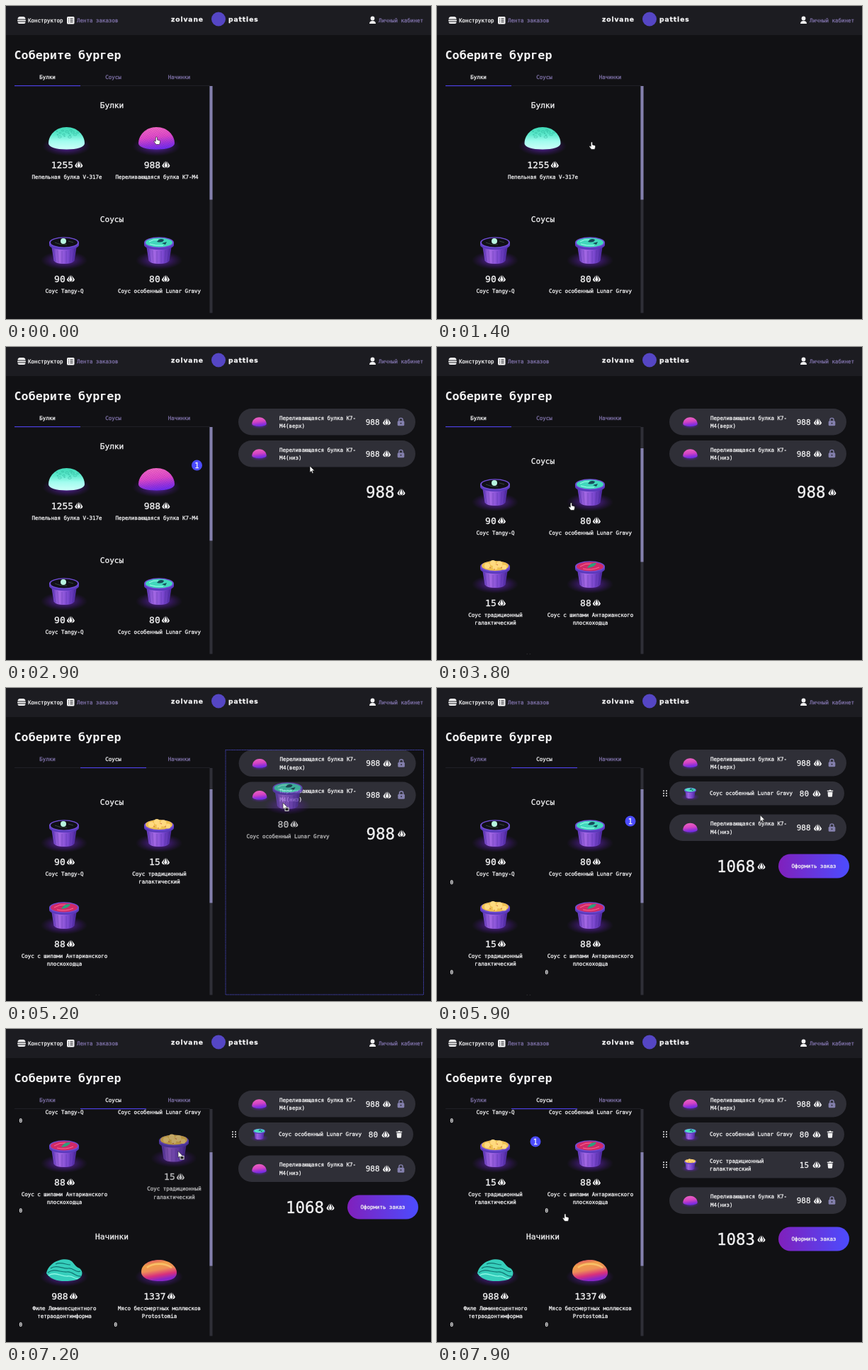
An HTML page for the animation above (8000 ms loop, 600x442 px).

```html
<!DOCTYPE html>
<html lang="ru">
<head>
<meta charset="utf-8">
<title>Соберите бургер</title>
<style>
  html, body { margin: 0; width: 100%; height: 100%; overflow: hidden; background: #111114; }
  svg { display: block; width: 600px; height: 442px; }
  text { font-family: "DejaVu Sans Mono", monospace; white-space: pre; stroke-width: .3px; }
  .logo { font-family: "DejaVu Sans", sans-serif; font-weight: bold; letter-spacing: .9px; }
</style>
</head>
<body>
<svg viewBox="0 0 600 442" xmlns="http://www.w3.org/2000/svg">
  <defs>
    <radialGradient id="glow">
      <stop offset="0" stop-color="#8a35ff" stop-opacity=".75"/>
      <stop offset=".6" stop-color="#6a22c8" stop-opacity=".3"/>
      <stop offset="1" stop-color="#5a1aa8" stop-opacity="0"/>
    </radialGradient>
    <linearGradient id="mintBun" x2="0" y2="1">
      <stop offset="0" stop-color="#3fd8b6"/><stop offset=".35" stop-color="#60ebce"/>
      <stop offset=".62" stop-color="#a0fcee"/><stop offset="1" stop-color="#ccfff8"/>
    </linearGradient>
    <linearGradient id="pinkBun" x1=".4" x2=".6" y2="1">
      <stop offset="0" stop-color="#f268c4"/><stop offset=".45" stop-color="#dd48c8"/>
      <stop offset=".75" stop-color="#9a34dc"/><stop offset="1" stop-color="#6a2cf0"/>
    </linearGradient>
    <linearGradient id="potFill">
      <stop offset="0" stop-color="#5a34b4"/><stop offset=".3" stop-color="#a468e4"/>
      <stop offset=".65" stop-color="#7c48d0"/><stop offset="1" stop-color="#48269a"/>
    </linearGradient>
    <linearGradient id="meatFill" x2=".3" y2="1">
      <stop offset="0" stop-color="#d8356e"/><stop offset=".3" stop-color="#f0a04a"/>
      <stop offset=".55" stop-color="#ee8f58"/><stop offset=".8" stop-color="#d8307c"/>
      <stop offset="1" stop-color="#8a25c8"/>
    </linearGradient>
    <linearGradient id="btnFill">
      <stop offset="0" stop-color="#8020bc"/><stop offset="1" stop-color="#4c4cff"/>
    </linearGradient>
    <pattern id="grain" width="2.4" height="2.4" patternUnits="userSpaceOnUse" patternTransform="rotate(35)">
      <circle cx="1" cy="1" r=".5" fill="#60107c" opacity=".4"/>
    </pattern>
    <path id="dome" d="M-25.500 7C-25.500-4-16-16 0-16S25.500-4 25.500 7C25.500 12 15 15.500 0 15.500S-25.500 12-25.500 7Z"/>
    <g id="gem" fill="#f2f2f3">
      <path d="M0-5L2.300 1.800 0 4.500-2.300 1.800Z"/>
      <path d="M-1.200-4.800L-5.600 1.200-4.500 3.600-1 4.700-3.300 1.700Z"/>
      <path d="M1.200-4.800L5.600 1.200 4.500 3.600 1 4.700 3.300 1.700Z"/>
    </g>
    <g id="pot">
      <ellipse cy="13" rx="33" ry="13" fill="url(#glow)"/>
      <path d="M-18-8L-14.500 13.500Q-12 18 0 18T14.500 13.500L18-8Z" fill="url(#potFill)"/>
      <path d="M-15-3L-12 15M-9-1L-8 16.500M-3 0V17M3 0V17M9-1L8 16.500M15-3L12 15" stroke="#3c2288" stroke-width=".9" opacity=".35"/>
      <path d="M-21-12V-8C-18 0 18 0 21-8V-12Z" fill="#5a3abc"/>
      <ellipse cy="-12" rx="21" ry="7.800" fill="#6f4cd4"/>
    </g>
    <g id="ash">
      <ellipse cy="11" rx="34" ry="14" fill="url(#glow)"/>
      <use href="#dome" fill="url(#mintBun)"/>
      <g fill="none" stroke="#25a892" stroke-width=".6" opacity=".75" id="craters"></g>
    </g>
    <g id="pink">
      <ellipse cy="11" rx="34" ry="14" fill="url(#glow)"/>
      <use href="#dome" fill="url(#pinkBun)"/><use href="#dome" fill="url(#grain)"/>
    </g>
    <g id="dark">
      <use href="#pot"/><ellipse cy="-12" rx="19" ry="6.500" fill="#101016"/>
      <path d="M-13-12Q-5-8 4-9M6-14L13-12" stroke="#35453f" fill="none"/>
      <circle cx="-1" cy="-14" r="4" fill="#b9f5e0"/>
    </g>
    <g id="mint">
      <use href="#pot"/><ellipse cy="-12" rx="19" ry="6.500" fill="#42d8bc"/>
      <path d="M-14-13Q-8-17-1-16M-13-10Q-5-7 6-8" stroke="#a4fff0" fill="none"/>
      <path d="M-3-13Q1-19 7-16 6-11-3-13ZM4-11L11-13 9-9Z" fill="#174c5c"/>
    </g>
    <g id="gold">
      <use href="#pot"/><ellipse cy="-13" rx="19" ry="7" fill="#eec050"/>
      <g fill="#ffda80"><circle cx="-11" cy="-13" r="4"/><circle cx="-3" cy="-17" r="4"/><circle cx="6" cy="-15" r="4.500"/><circle cx="0" cy="-11" r="3.500"/><circle cx="13" cy="-11" r="3.500"/></g>
      <path d="M-8-11l2 1M2-15l2 1M8-10l2-1M-2-8l2 0" stroke="#d06a48"/>
    </g>
    <g id="rose">
      <use href="#pot"/><ellipse cy="-12" rx="19" ry="6.500" fill="#d02a68"/>
      <path d="M-14-12Q-6-17 2-16M-10-9Q2-6 13-11" stroke="#ff6a90" fill="none"/>
      <path d="M-4-10Q0-18 9-17 7-11-4-10Z" fill="#2ca07c"/>
    </g>
    <g id="fillet">
      <ellipse cy="9" rx="34" ry="14" fill="url(#glow)"/>
      <path d="M-25 4C-22-10-6-18 7-15 14-13 14-6 22-3 28 2 26 10 18 13 2 17-18 16-25 4Z" fill="#36cfbc"/>
      <path d="M-23 3C-14-4-5 3 4 2S17 10 24 8M-19-3C-11-9-2-2 6-3S16 4 23 1M-12-9C-4-13 2-8 9-8" fill="none" stroke="#10716f" stroke-width="1.200"/>
      <path d="M-22 7C-12 1-4 9 5 8S14 13 20 11" fill="none" stroke="#8cf8e6" stroke-width="1.300"/>
    </g>
    <g id="meat">
      <ellipse cy="9" rx="34" ry="14" fill="url(#glow)"/>
      <path d="M-25 2C-25-9-13-15 0-15S25-7 25 3 13 15 0 15-25 11-25 2Z" fill="url(#meatFill)"/>
      <path d="M-17-4C-9-11 8-11 18-4" fill="none" stroke="#ffd97a" stroke-width="2.500" opacity=".6"/>
    </g>
    <g id="lock" fill="#8480ad">
      <rect x="-4.800" y="-1.500" width="9.600" height="7" rx="1.500"/>
      <path d="M-2.600-1V-2.800A2.600 2.600 0 0 1 2.600-2.800V-1" fill="none" stroke="#8480ad" stroke-width="1.400"/>
      <circle cy="2" r="1" fill="#2f2f37"/>
    </g>
    <path id="bin" fill="#f2f2f3" d="M-4.200-4H-1.500L-1-5H1L1.500-4H4.200V-2.700H-4.200ZM-3.500-2H3.500L3 4Q2.900 5 2 5H-2Q-2.900 5-3 4Z"/>
    <path id="dots" d="M-2-3.500h0M2-3.500h0M-2 0h0M2 0h0M-2 3.500h0M2 3.500h0" stroke="#f2f2f3" stroke-width="2" stroke-linecap="round"/>
    <path id="hand" fill="#fff" stroke="#111" stroke-width=".6" d="M-1.200 1a1.100 1.100 0 0 1 2.200 0V4l3.300.9q.9.300.8 1.300l-.4 2.700q-.3 1.600-1.600 1.600H.2q-.9 0-1.500-.8l-2.200-3.300q-.3-.9.800-.9l1.500.8Z"/>
    <path id="arrow" fill="#fff" stroke="#111" stroke-width=".6" d="M0 0V9.200L2.100 7.300 3.500 10.400 5 9.700 3.600 6.700H6.500Z"/>
    <g id="carry"><use href="#arrow"/><rect x="3" y="7" width="5" height="4.500" fill="#222" stroke="#eee" stroke-width=".9"/></g>
    <clipPath id="view"><rect x="0" y="113" width="287" height="320.500"/></clipPath>
  </defs>
  <g id="head"></g>
  <g id="tabs"></g>
  <g clip-path="url(#view)"><g id="list"></g></g>
  <rect x="287.500" y="113" width="4" height="320.500" fill="#2f2f37"/>
  <rect id="thumb" x="287.500" width="4" height="160.500" fill="#8480ad"/>
  <g id="order"></g>
  <g id="ghost" opacity=".75"></g>
  <use id="cursor"/>
</svg>
<script>
const LOOP = 8000, STEP = 100;
const WHITE = '#f2f2f3', DIM = '#7d70a6';
const $ = id => document.getElementById(id);

const text = (x, y, str, size = 7.5, anchor = 'start', fill = WHITE, extra = '') =>
  `<text x="${x}" y="${y + size * .365}" font-size="${size * .996}" text-anchor="${anchor}" fill="${fill}" stroke="${fill}" ${extra}>${str}</text>`;
const use = (id, x, y, k = 1) => `<use href="#${id}" transform="translate(${x} ${y}) scale(${k})"/>`;
const box = (x, y, w, h, r, fill) => `<rect x="${x}" y="${y}" width="${w}" height="${h}" rx="${r}" fill="${fill}"/>`;

const goods = {
  ash: { price: 1255, label: ['Пепельная булка V-317e'] },
  pink: { price: 988, label: ['Переливающаяся булка K7-M4'] },
  dark: { price: 90, label: ['Соус Tangy-Q'] },
  mint: { price: 80, label: ['Соус особенный Lunar Gravy'] },
  gold: { price: 15, label: ['Соус традиционный', 'галактический'] },
  rose: { price: 88, label: ['Соус с шипами Антарианского', 'плоскоходца'] },
  fillet: { price: 988, label: ['Филе Люминесцентного', 'тетраодонтимформа'] },
  meat: { price: 1337, label: ['Мясо бессмертных моллюсков', 'Protostomia'] }
};
const sections = [
  { name: 'Булки', y: 140, first: 224, cols: [86, 213], ids: ['ash', 'pink'], lift: 37 },
  { name: 'Соусы', y: 301, first: 385, cols: [82.5, 216.5], ids: ['dark', 'mint', 'gold', 'rose'], lift: 39 },
  { name: 'Начинки', y: 578, first: 662, cols: [82.5, 216.5], ids: ['fillet', 'meat'], lift: 36 }
];

// What is dragged, where it was grabbed, and what lies in the order
const states = [
  [0, {}],
  [900, { drag: 'pink' }],
  [1700, { ghost: { cx: 213, y: 224, x0: 212.5, y0: 186 } }],
  [2700, { drag: null, ghost: null, bun: true }],
  [4000, { tab: 1 }],
  [4500, { drag: 'mint', ghost: { cx: 216.5, y: 245, x0: 209.5, y0: 215 } }],
  [5700, { drag: null, ghost: null, fill: ['mint'] }],
  [7000, { drag: 'gold', ghost: { cx: 82.5, y: 216, x0: 88, y0: 180 } }],
  [7500, { drag: null, ghost: null, fill: ['mint', 'gold'] }]
];
const path = [
  [0, 212.5, 185], [700, 212.5, 185], [1400, 218.5, 192], [1600, 222, 192], [2100, 350, 180],
  [2500, 418, 167], [2900, 429, 168], [3100, 400, 178], [3500, 196, 219], [3800, 189.5, 220],
  [4300, 209, 215], [4600, 212, 214], [5200, 391, 162], [5600, 425, 166], [6000, 462, 182],
  [6200, 452, 188], [6500, 276, 226], [6600, 267, 226], [6700, 256, 224], [6950, 88, 180],
  [7000, 90, 180], [7400, 396, 165], [7500, 402, 165], [7900, 181, 261], [8000, 178, 262]
];
const scrolls = [[0, 0], [3400, 0], [3700, 140], [6400, 140], [6600, 233], [6700, 233], [6800, 285], [8000, 285]];

function sample(keys, t) {
  let i = 1;
  while (i < keys.length - 1 && keys[i][0] <= t) i++;
  const a = keys[i - 1], b = keys[i], k = Math.min(1, (t - a[0]) / (b[0] - a[0]));
  const e = k * k * (3 - 2 * k);
  return a.slice(1).map((v, n) => v + (b[n + 1] - v) * e);
}
function stateAt(t) {
  const s = { drag: null, ghost: null, bun: false, tab: 0, fill: [] };
  for (const [at, change] of states) if (at <= t) Object.assign(s, change);
  return s;
}

function card(id, cx, y, lift, s) {
  const { price, label } = goods[id], w = String(price).length * 7.9;
  const left = cx - (w + 13) / 2;
  let out = use(id, cx - .5, y - lift) + text(left, y, price, 13.1) + use('gem', left + w + 7.5, y);
  label.forEach((line, i) => out += text(cx, y + 17.2 + i * 11.3, line, 7.5, 'middle'));
  if (!s) return out;
  if (s.fill.includes(id) || (s.bun && id === 'pink')) {
    out += `<circle cx="${cx + 56.5}" cy="${y - 57}" r="7.500" fill="#4c4cff"/>` +
      text(cx + 56.5, y - 57, 1, 10.5, 'middle');
  } else if (s.fill.length && id !== 'ash' && id !== 'pink') {
    out += text(cx - 64, y + 17.5 + label.length * 11.3, 0);
  }
  return out;
}

function drawList(s) {
  return sections.map(({ name, y, first, cols, ids, lift }) => {
    const shown = ids.filter(id => id !== s.drag);
    return text(149.5, y, name, 11.25, 'middle') + shown.map((id, i) => {
      const cx = shown.length === 1 ? 149.5 : cols[i % 2];
      return card(id, cx, first + (i >> 1) * 116, lift, s);
    }).join('');
  }).join('');
}

function drawTabs(s) {
  return box(12, 112.3, 276, .8, 0, '#25252d') + sections.map(({ name }, i) => {
    const on = i === s.tab;
    return text(58.5 + i * 93, 100.5, name, 7.5, 'middle', on ? WHITE : DIM) +
      (on ? box(12 + i * 93, 112, 93, 1.2, 0, '#4c3fe0') : '');
  }).join('');
}

function row(id, y, lines, locked) {
  const h = lines.length > 1 ? 37.5 : 33.5, mid = y + h / 2;
  let out = box(328, y, locked ? 250 : 247, h, h / 2, '#2f2f37') + use(id, 357.5, mid, .4);
  lines.forEach((l, i) => out += text(locked ? 386 : 385, mid + (i - (lines.length - 1) / 2) * 11.3, l));
  out += text(locked ? 527.5 : 525, mid, goods[id].price, 11, 'end') + use('gem', locked ? 537.5 : 536, mid);
  return out + (locked ? use('lock', 557.5, mid) : use('bin', 555, mid) + use('dots', 322, mid));
}

function drawOrder(s, over) {
  let out = '';
  if (s.bun) {
    const bun = (y, part) => row('pink', y, ['Переливающаяся булка K7-', `M4(${part})`], true);
    let y = 132, sum = goods.pink.price;
    out += bun(87, 'верх');
    for (const id of s.fill) {
      const { label, price } = goods[id];
      out += row(id, y, label, false);
      y += (label.length > 1 ? 37.5 : 33.5) + 7.5;
      sum += price;
    }
    if (s.fill.length) y += 5.5;
    out += bun(y, 'низ');
    const mid = y + 73, ready = s.fill.length > 0;
    out += text(ready ? 449 : 548.5, mid, sum, 22.5, 'end') + use('gem', ready ? 458 : 558, mid);
    if (ready) out += box(482, mid - 17, 100, 34, 17, 'url(#btnFill)') + text(532, mid, 'Оформить заказ', 7.5, 'middle');
  }
  if (!over) return out;
  return `<g transform="translate(.6 .6)">${out}</g>` +
    '<rect x="310" y="87.500" width="279.500" height="345.500" fill="none" stroke="#4c4cd0" stroke-width=".9" stroke-dasharray="1.500 .8"/>';
}

function drawHead() {
  return box(0, 0, 600, 41, 0, '#1c1c21') +
    `<path d="M16.500 18.500Q16.500 15 20 15H24Q27.500 15 27.500 18.500ZM16.500 22.500H27.500Q27.500 25 25 25H19Q16.500 25 16.500 22.500Z" fill="${WHITE}"/>` +
    box(16, 19.6, 12, 1.8, .9, WHITE) + text(31, 20.5, 'Конструктор') +
    box(86, 15, 10.5, 10.5, 1.5, WHITE) +
    '<path d="M88 18h1M90.500 18h4M88 20.300h1M90.500 20.300h4M88 22.600h1M90.500 22.600h4" stroke="#1c1c21" stroke-width="1"/>' +
    text(100, 20.5, 'Лента заказов', 7.5, 'start', DIM) +
    text(233, 18.5, 'zolvane', 9.2, 'start', WHITE, 'class="logo"') +
    '<circle cx="300" cy="18.500" r="10" fill="#5546c4"/>' +
    text(314, 18.5, 'patties', 9.2, 'start', WHITE, 'class="logo"') +
    `<circle cx="517.500" cy="17.500" r="2.900" fill="${WHITE}"/><path d="M513 25Q513 21 517.500 21T522 25Z" fill="${WHITE}"/>` +
    text(526, 20.5, 'Личный кабинет', 7.5, 'start', DIM) +
    text(11.5, 68.5, 'Соберите бургер', 16.8, 'start', WHITE, 'font-weight="bold" stroke-opacity="0"');
}

$('head').innerHTML = drawHead();
$('craters').innerHTML = Array.from({ length: 15 }, (_, i) => {
  const a = i * 2.4, r = Math.sqrt((i + .5) / 15);
  return `<ellipse cx="${Math.cos(a) * r * 17}" cy="${Math.sin(a) * r * 6 - 7}" rx="${1 + i % 3 * .7}" ry="${.6 + i % 3 * .4}"/>`;
}).join('');

let shownKey = '';
function render(t) {
  const s = stateAt(t), [x, y] = sample(path, t), [scroll] = sample(scrolls, t);
  const over = !!s.ghost && x > 310;
  const key = JSON.stringify([s, over]);
  if (key !== shownKey) {
    shownKey = key;
    $('tabs').innerHTML = drawTabs(s);
    $('list').innerHTML = drawList(s);
    $('order').innerHTML = drawOrder(s, over);
    $('ghost').innerHTML = s.ghost ? card(s.drag, s.ghost.cx, s.ghost.y, s.drag === 'pink' ? 37 : 39) : '';
  }
  if (s.ghost) $('ghost').setAttribute('transform', `translate(${x - s.ghost.x0} ${y - s.ghost.y0})`);
  $('list').setAttribute('transform', `translate(0 ${-scroll})`);
  $('thumb').setAttribute('y', 113 + scroll * 3 / 14);
  $('cursor').setAttribute('href', s.ghost ? '#carry' : x < 287 ? '#hand' : '#arrow');
  $('cursor').setAttribute('transform', `translate(${x} ${y})`);
}

const start = performance.now();
function tick() {
  const t = (performance.now() - start) % LOOP;
  render(Math.floor(t / STEP) * STEP);
  requestAnimationFrame(tick);
}
tick();
</script>
</body>
</html>
```
